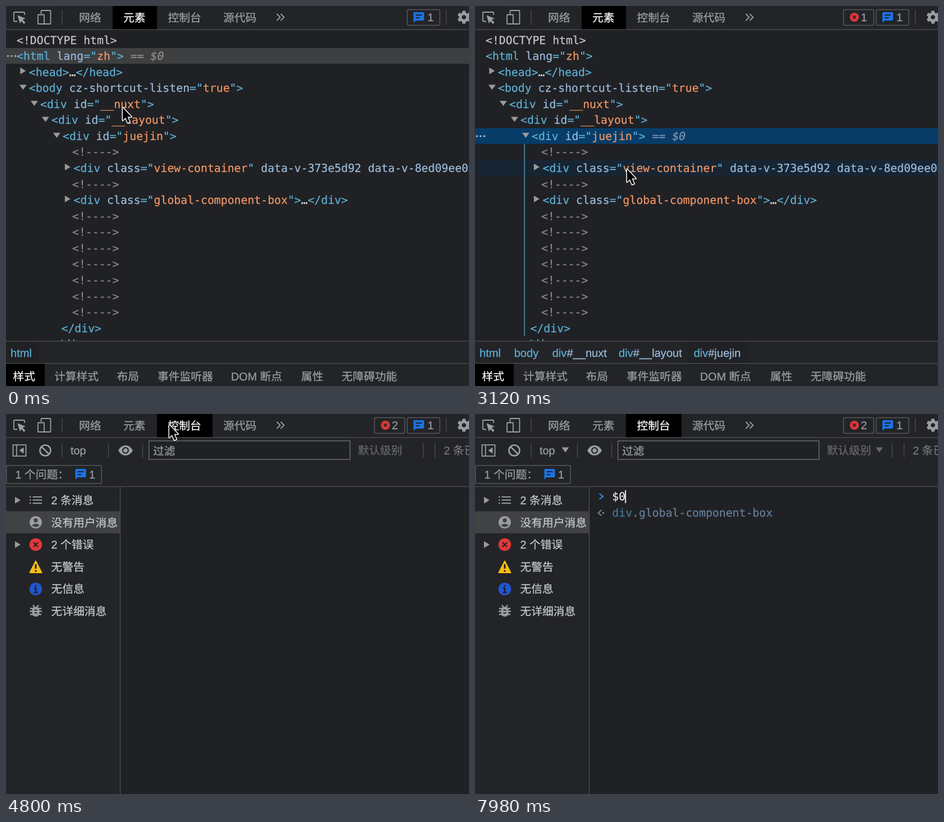
These frames come from a looping animation (825 by 678 pixels, 8 s). An HTML page:

```html
<!DOCTYPE html>
<html lang="zh-CN">
<head>
<meta charset="utf-8">
<style>
html, body { margin: 0; width: 100%; height: 100%; overflow: hidden; background: #202124; }
svg { display: block; width: 825px; height: 678px; }
text { white-space: pre; stroke-width: .25px; text-rendering: geometricPrecision; font: 19.75px "Liberation Sans", "Noto Sans CJK SC", "Noto Sans CJK", sans-serif; }
.mono { font: 19.81px "DejaVu Sans Mono", monospace; }
.crumb { font-size: 20.1px; }
</style>
</head>
<body>
<svg id="stage" viewBox="0 0 825 678"></svg>
<script>
const LOOP = 8000;
const BG = '#202124', BAR = '#232427', EDGE = '#4a4b4e', GREY = '#9aa0a6';
const TAG = '#5db0d7', ATTR = '#9bbbdc', VALUE = '#f29766', NOTE = '#898989';

const rect = (x, y, w, h, fill, more = '') => `<rect x="${x}" y="${y}" width="${w}" height="${h}" fill="${fill}" ${more}/>`;
const path = (d, stroke, width = 2, more = 'fill="none"') => `<path d="${d}" stroke="${stroke}" stroke-width="${width}" ${more}/>`;
const shape = (d, fill) => `<path d="${d}" fill="${fill}"/>`;
const disc = (x, y, r, fill) => `<circle cx="${x}" cy="${y}" r="${r}" fill="${fill}"/>`;
const label = (x, y, s, fill = GREY, more = '') => `<text x="${x}" y="${y}" fill="${fill}" stroke="${fill}" ${more}>${s}</text>`;
const mono = (x, y, s, fill = TAG) => label(x, y, s, fill, 'class="mono"');
const span = (s, fill) => `<tspan fill="${fill}" stroke="${fill}">${s}</tspan>`;
const group = (id, s) => `<g id="${id}">${s}</g>`;
const esc = s => s.replace(/</g, '&lt;').replace(/>/g, '&gt;');
const rightTri = (x, y, c = '#9a9a9a') => shape(`M${x - 5} ${y - 6}v12l10 -6z`, c);
const downTri = (x, y, c = '#9a9a9a') => shape(`M${x - 6.5} ${y - 4.5}h13l-6.5 9z`, c);
const divider = (x, y = 7) => rect(x - .7, y, 1.4, 26, EDGE);
const outline = (x, y, w, h, c = '#56575a') => rect(x, y, w, h, 'none', `stroke="${c}" stroke-width="1.5" rx="2.5"`);
const cross = (x, y, r, c, w) => path(`M${x - r} ${y - r}l${2 * r} ${2 * r}m0 ${-2 * r}l${-2 * r} ${2 * r}`, c, w);

const bubble = (x, y) => shape(`M${x + 2} ${y}h15q2 0 2 2v11q0 2 -2 2h-13l-4 4v-17q0 -2 2 -2z`, '#1a73e8')
  + path(`M${x + 4} ${y + 5}h11m-11 5h7`, BG, 1.8);

function gear(x, y) {
  let s = '';
  for (let a = 0; a < 360; a += 60)
    s += rect(x - 3, y - 11.5, 6, 7, '#9a9da1', `rx="1" transform="rotate(${a} ${x} ${y})"`);
  return s + `<circle cx="${x}" cy="${y}" r="6.3" fill="none" stroke="#9a9da1" stroke-width="5"/>`;
}

// Elements tree: text x, disclosure state, markup
const ROWS = [
  [19, '', '<!DOCTYPE html>'],
  [19, '', '<html lang="zh">'],
  [41, 'closed', '<head>…</head>'],
  [41, 'open', '<body cz-shortcut-listen="true">'],
  [61, 'open', '<div id="__nuxt">'],
  [81, 'open', '<div id="__layout">'],
  [101, 'open', '<div id="juejin">'],
  [118, '', '<!---->'],
  [120.5, 'closed', '<div class="view-container" data-v-373e5d92 data-v-8ed09ee0>'],
  [118, '', '<!---->'],
  [120.5, 'closed', '<div class="global-component-box">…</div>'],
  ...Array.from({ length: 7 }, () => [118, '', '<!---->']),
  [98.5, '', '</div>'],
  [79, '', '</div>']
];
const WRAPPED = 8, WRAP = 27, PITCH = 28.57, ADVANCE = 11.927;
const rowTop = (i, sel) => 46.4 + i * PITCH + (sel === WRAPPED && i > WRAPPED ? WRAP : 0);

function markup(s) {
  if (s.startsWith('<!-')) return span(esc(s), NOTE);
  if (s.startsWith('<!D')) return span(esc(s), '#c6c6c6');
  return s.replace(/(<\/?\w+)|( [\w-]+)(?:="([^"]*)")?|(>)|…/g, (m, tag, name, value, end) => {
    if (tag || end) return span(esc(m), TAG);
    if (!name) return span(m, '#e0e0e0');
    return span(name, ATTR) + (value ? span('="', TAG) + span(value, VALUE) + span('"', TAG) : '');
  });
}

function guide(i, sel, color, dash = '') {
  const top = rowTop(i + 1, sel), bottom = i === 6 ? 589 : 598;
  return path(`M${ROWS[i][0] - 12.8} ${top}V${bottom}`, color, 1.4, `fill="none" stroke-dasharray="${dash}"`);
}

function tree(sel, hover) {
  let s = '';
  const selTop = Math.round(rowTop(sel, sel)), selHeight = 28 + (sel === WRAPPED ? WRAP : 0);
  const selBase = rowTop(sel, sel) + 21.1;
  if (hover >= 0 && hover !== sel) {
    s += rect(5, Math.round(rowTop(hover, sel)), 825, 28, '#172533', 'rx="4"');
    if (ROWS[hover][1] === 'open') s += guide(hover, sel, '#2e3236', '2 2');
  }
  s += rect(0, selTop, 825, selHeight, sel === 1 ? '#3e3f41' : '#073d69');
  for (const x of [3.5, 10, 16.5]) s += disc(x, selTop + 14.3, 1.8, sel === 1 ? '#a8a8a8' : '#a3b9cc');
  if (sel !== 1 && ROWS[sel][1] === 'open') s += guide(sel, sel, '#559dc0');
  ROWS.forEach(([x, arrow, text], i) => {
    const y = rowTop(i, sel);
    if (arrow === 'open') s += downTri(x - 10.6, y + 13);
    if (arrow === 'closed') s += rightTri(x - 10.6, y + 12.2);
    s += mono(x, y + 21.1, markup(text));
  });
  const wrapped = sel === WRAPPED;
  const markX = ROWS[sel][0] + ADVANCE * (wrapped ? 1 : ROWS[sel][2].length + 1);
  return s + mono(markX, selBase + (wrapped ? WRAP : 0),
    '== <tspan font-style="italic">$0</tspan>', sel === 1 ? '#909090' : '#8098ac');
}

// Breadcrumbs: text x, right edge, tag, rest
const CRUMBS = [
  [8, 59, 'html', ''], [69.7, 126, 'body', ''], [137.7, 247, 'div', '#__nuxt'],
  [256, 379, 'div', '#__layout'], [389.7, 485, 'div', '#juejin'], [495.7, 667, 'div', '.view-container']
];
const DEPTH = { 1: 1, 4: 3, 5: 4, 6: 5, 8: 6, 10: 6 };

function crumbs(sel) {
  const list = CRUMBS.slice(0, DEPTH[sel]);
  if (sel === 10) list[5] = [495.7, 731, 'div', '.global-component-box'];
  const last = list.length - 1, left = last ? list[last - 1][1] : 0;
  return rect(left, 599, list[last][1] - left, 38, BG)
    + list.map(([x, , tag, rest]) => label(x, 625.5, span(tag, TAG) + span(rest, ATTR), TAG, 'class="crumb"')).join('');
}

const TABS = [[130, '网络'], [209, '元素'], [288.5, '控制台'], [387, '源代码']];

function toolbar(inConsole, errors) {
  let s = rect(0, 0, 825, 42, BAR) + rect(0, 41.3, 825, 1.4, EDGE);
  s += inConsole ? rect(269, 0, 99, 41.3, '#000') : rect(190, 0, 79, 41.3, '#000');
  s += path('M20 27.5H15.5Q14 27.5 14 26V12.500Q14 11 15.500 11H31.500Q33 11 33 12.500V16', GREY, 1.8);
  s += shape('M20.500 16.500L35 22.300L29.500 24.200L34.500 29.500L32 32L27 26.800L25 31.500z', GREY);
  s += path('M62.500 14V9Q62.500 8 63.500 8H78.500Q79.500 8 79.500 9V31Q79.500 32 78.500 32H68', GREY, 1.8)
    + rect(57, 15.5, 11, 16.5, BAR, `stroke="${GREY}" stroke-width="1.8" rx="1"`);
  s += divider(100) + divider(784.5);
  TABS.forEach(([x, t], i) => s += label(x, 27.5, t, i === (inConsole ? 2 : 1) ? '#fff' : GREY));
  s += path('M482.500 14l6 6l-6 6m7 -12l6 6l-6 6', GREY, 1.8);
  s += outline(715, 6.5, 58, 28) + bubble(726, 11) + label(751, 27, '1');
  if (errors) s += outline(656.5, 6.5, 54, 28) + disc(676, 20, 8, '#e0383a') + cross(676, 20, 2.8, BG, 1.8) + label(687.5, 27, errors);
  return s + gear(816, 20);
}

const PANES = [[12.5, '样式'], [86, '计算样式'], [197.5, '布局'], [270, '事件监听器'], [401, 'DOM 断点'], [526, '属性'], [598, '无障碍功能']];
const footer = rect(0, 598, 825, 80, BAR) + rect(0, 597.3, 825, 1.4, EDGE) + group('crumbs', '')
  + rect(0, 637, 825, 1.4, EDGE) + rect(0, 638.4, 69, 40, '#000')
  + PANES.map(([x, t], i) => label(x, 667.5, t, i ? GREY : '#fff')).join('');

function consolePane() {
  let s = rect(0, 42.7, 825, 87, BAR) + rect(0, 130, 203, 548, BAR);
  s += path('M12.500 55.200H35.500V75.200H12.500zM18.800 55V75', GREY, 1.8) + shape('M31.500 59.500v11l-8 -5.500z', GREY);
  s += path('M79.500 65a9.500 9.500 0 1 0 -19 0a9.500 9.500 0 1 0 19 0M63.300 58.300L76.700 71.700', GREY, 2.6);
  for (const x of [100, 182.5, 243.5, 743.5, 764.5]) s += divider(x, 52);
  s += label(115, 72, 'top');
  s += shape('M200 65Q205 56 213 56T226 65Q221 74 213 74T200 65z', GREY) + disc(213, 65, 6, BAR) + disc(213, 65, 3.7, GREY);
  s += rect(254.7, 48, 358.3, 33, BG, 'stroke="#68696b" stroke-width="1.5"') + label(262, 72.5, '过滤');
  s += label(627, 72, '默认级别', '#67696d') + label(780, 72, '2 条已', '#77797d');
  s += outline(.7, 91.7, 169.5, 32.3) + label(16.5, 115, '1 个问题：') + bubble(123.5, 98) + label(148, 115, '1');
  s += rect(0, 128.8, 825, 1.4, EDGE) + rect(0, 173.5, 203, 39.3, '#414244') + rect(202.8, 129, 1.4, 549, EDGE);
  ['2 条消息', '没有用户消息', '2 个错误', '无警告', '无信息', '无详细消息'].forEach((t, i) => {
    s += label(80.5, 161 + i * 39.6, t, '#c6cacf');
    if (i === 0 || i === 2) s += rightTri(21, 153.7 + i * 39.6);
  });
  s += path('M42 148h2.500m3 0H64M42 153.600h2.500m3 0H64M42 159.200h2.500m3 0H64', GREY, 2);
  s += disc(53, 193.3, 11, '#9b9da0') + disc(53, 189.7, 3.7, '#414244') + shape('M46 198.500Q53 193 60 198.500Q53 205 46 198.500z', '#414244');
  s += disc(53, 233, 11.3, '#e0383a') + cross(53, 233, 4, BG, 2);
  s += path('M53 262.500L63.500 283H42.500z', '#f9bd13', 2, 'fill="#f9bd13" stroke-linejoin="round"') + path('M53 268v8m0 2.500v3', BG, 3);
  s += disc(53, 312.3, 11.3, '#2155d0') + path('M53 305v3.200M50 311h3v7.500m-3.500 0h7', BG, 2.6);
  s += rect(46.5, 344, 13, 17.5, '#9a9da0', 'rx="6"')
    + path('M43 347h20M42 352h22M43 357.500h20M48 341l3 4m7 -4l-3 4', '#9a9da0', 2.4) + path('M50.500 350h5m-5 5h5', BAR, 2);
  s += group('ready', downTri(161, 64) + downTri(720.5, 64, '#67696d')
    + `<path id="prompt" d="M221.500 142l6.500 5l-6.500 5" fill="none" stroke-width="2.2"/>`);
  s += mono(244.3, 154.2, '', '#e8eaed').replace('<text', '<text id="typed"');
  s += group('caret', rect(0, 136, 1.8, 23, '#fff'));
  s += group('preview', path('M225.500 171.500l-6 5l6 5', '#85878a', 1.8) + disc(228.5, 176.5, 1.7, '#85878a')
    + mono(244.3, 183, span('div', '#44779a') + span('.global-component-box', '#657f9b')));
  return s;
}

const beam = 'M-6.500 -12.500Q0 -12.500 0 -8.500V8.500Q0 12.500 -6.500 12.500M6.500 -12.500Q0 -12.500 0 -8.500M0 8.500Q0 12.500 6.500 12.500M-3.500 5H3.500';
const stage = document.getElementById('stage');
stage.innerHTML = rect(0, 0, 825, 678, BG) + group('elements', group('tree', '') + footer)
  + group('console', consolePane()) + group('toolbar', '')
  + group('arrow', path('M1 1.500V24L6 19.200L10 28.500L13.500 27L9.600 17.800H16.500z', '#fff', 3, 'fill="#000" stroke-linejoin="round" paint-order="stroke"'))
  + group('beam', path(beam, '#fff', 4.4) + path(beam, '#000', 1.6));

const el = id => document.getElementById(id);
const show = (id, on) => el(id).setAttribute('display', on ? 'inline' : 'none');
const move = (id, x, y) => el(id).setAttribute('transform', `translate(${x.toFixed(1)} ${y.toFixed(1)})`);
const cache = {};
function fill(id, html) {
  if (cache[id] !== html) el(id).innerHTML = cache[id] = html;
}

const PICKS = [[0, 1], [660, 4], [1800, 5], [2640, 6], [3540, 8], [4140, 10]];
const ERRORS = [[0, 0], [2100, 1], [3600, 2]];
const TYPED = [[0, ''], [7380, '$'], [7920, '$0']];
const at = (steps, t) => steps.filter(s => s[0] <= t).pop()[1];

const POINTER = [
  [0, 207, 180], [700, 208, 181], [1260, 214, 205], [1840, 217, 208], [2400, 236, 232], [2700, 240, 236],
  [3120, 270, 290], [3560, 273, 293], [3900, 302, 369], [4200, 303, 370], [4620, 291, 20],
  [4800, 290, 18], [5040, 290, 20], [5460, 297, 155], [LOOP, 297, 155]
];

function pointer(t) {
  const i = POINTER.findIndex(p => p[0] > t), [t0, x0, y0] = POINTER[i - 1], [t1, x1, y1] = POINTER[i];
  const u = (t - t0) / (t1 - t0), e = u * u * (3 - 2 * u);
  return [x0 + (x1 - x0) * e, y0 + (y1 - y0) * e];
}

function hovered(t, y, sel) {
  if (t < 60 || y < 46) return -1;
  for (let i = 18; i >= 0; i--) if (y >= rowTop(i, sel)) return i;
  return -1;
}

function update(t) {
  const [x, y] = pointer(t), sel = at(PICKS, t), inConsole = t >= 4740, typed = at(TYPED, t);
  show('elements', !inConsole);
  show('console', inConsole);
  fill('toolbar', toolbar(inConsole, at(ERRORS, t)));
  if (!inConsole) {
    fill('tree', tree(sel, hovered(t, y, sel)));
    fill('crumbs', crumbs(sel));
  }
  const focus = t >= 6600, since = t - (typed === '$0' ? 7920 : typed ? 7380 : 6600);
  show('ready', t >= 5100);
  el('prompt').setAttribute('stroke', focus ? '#3287e0' : '#2a6ba3');
  fill('typed', typed);
  show('caret', focus && since % 1000 < 500);
  move('caret', 244 + typed.length * ADVANCE - .6, 0);
  show('preview', t >= 7980);
  const text = inConsole && y > 130;
  show('arrow', !text);
  show('beam', text && !typed);
  move(text ? 'beam' : 'arrow', x, y);
}

// Advance in 60 ms steps
function frame(now) {
  update(Math.floor(now % LOOP / 60) * 60);
  requestAnimationFrame(frame);
}
update(0);
requestAnimationFrame(frame);
</script>
</body>
</html>
```
